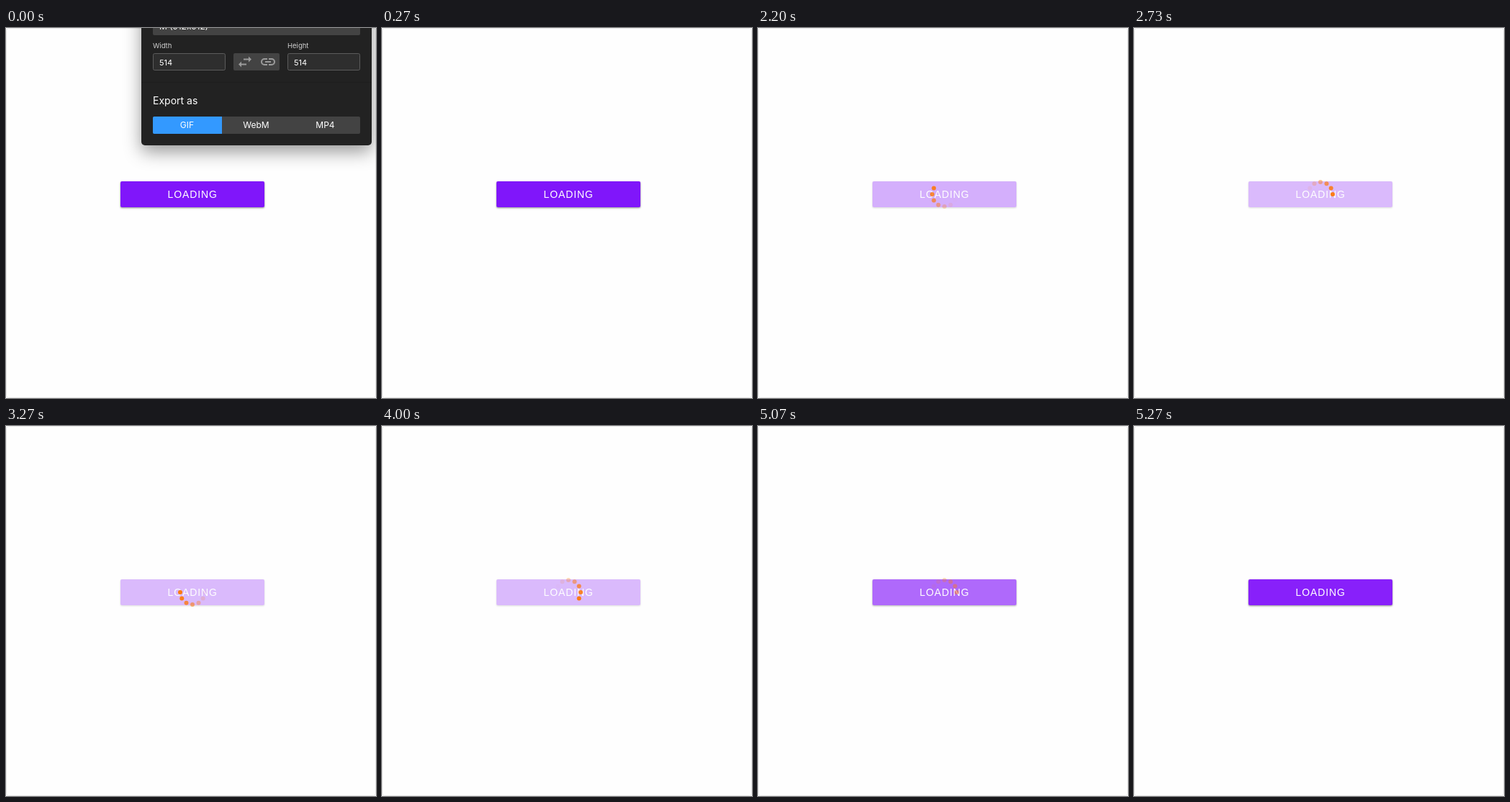
Animation, 514 px wide and 514 px high, one loop 5.34 s. Source, as an HTML page:

```html
<!DOCTYPE html>
<html lang="en">
<head>
<meta charset="utf-8">
<title>Loading button</title>
<style>
  html, body { margin: 0; width: 100%; height: 100%; overflow: hidden; background: #fefefe; }
  svg { display: block; width: 100vw; height: 100vh; }
  text { fill: #fff; font-family: Inter, "Liberation Sans", sans-serif; font-size: 12px; }
  .face { filter: drop-shadow(0 1px 1px rgba(0,0,0,.32)) drop-shadow(0 1px 1px rgba(0,0,0,.15)); }
  .caption { font: 14px "Liberation Sans", Arial, sans-serif; letter-spacing: .9px; text-anchor: middle; }
  .window { fill: #222; filter: drop-shadow(0 9px 12px rgba(0,0,0,.4)); }
  .control { fill: #434343; }
  .field { fill: #2e2e2e; stroke: #5c5c5c; }
  .label { font-size: 9.5px; fill: #d2d2d2; }
  .value { font-size: 11px; }
  .heading { font-size: 14px; }
  .tab { text-anchor: middle; }
  .icon { fill: none; stroke: #9b9b9b; stroke-width: 2; }
</style>
</head>
<body>
<svg viewBox="0 0 514 514">
  <rect x=".5" y=".5" width="513" height="513" rx="3" fill="#fefefe" stroke="#e8e8e8"/>

  <g id="button">
    <rect id="face" class="face" x="159" y="213" width="200" height="36" rx="2"/>
    <text class="caption" x="259.2" y="236">LOADING</text>
  </g>
  <g id="spinner" fill="#fb7a12"></g>

  <g id="panel">
    <rect class="window" x="188" y="-60" width="320" height="223" rx="5"/>
    <rect class="control" x="204" y="-14" width="288" height="24" rx="2"/>
    <text x="213" y="2">M (512x512)</text>
    <text class="label" x="204" y="28">Width</text>
    <text class="label" x="391" y="28">Height</text>
    <rect class="field" x="204.5" y="35.5" width="100" height="23" rx="2"/>
    <rect class="field" x="391.5" y="35.5" width="100" height="23" rx="2"/>
    <text class="value" x="213" y="52">514</text>
    <text class="value" x="400" y="52">514</text>
    <rect class="control" x="316" y="35" width="64" height="24" rx="2"/>
    <path class="icon" d="M330 43.5h8M334 50.5h-8"/>
    <path fill="#9b9b9b" d="M337 39.5l4 4l-4 4zM327 46.5l-4 4l4 4z"/>
    <path class="icon" d="M363 43h-4a4 4 0 0 0 0 8h4M365 43h4a4 4 0 0 1 0 8h-4M360 47h8"/>
    <path d="M188 75.5h320" stroke="#1d1d1d"/>
    <text class="heading" x="204" y="106">Export as</text>
    <rect class="control" x="204" y="123" width="288" height="24" rx="2"/>
    <path d="M300 123v24h-94a2 2 0 0 1-2-2v-20a2 2 0 0 1 2-2z" fill="#3399ff"/>
    <text class="tab" x="251.5" y="139">GIF</text>
    <text class="tab" x="347.5" y="139">WebM</text>
    <text class="tab" x="443.5" y="139">MP4</text>
  </g>
</svg>
<script>
const LOOP = 5340, HOVER = 970, LOAD = 1875, DONE = 4865;
const FADE = 400, SPIN = 1200, DOTS = 12;
const IDLE_COLOR = [128, 22, 250], HOVER_COLOR = [136, 32, 250];

const [button, face, spinner, panel] =
  ['button', 'face', 'spinner', 'panel'].map(id => document.getElementById(id));

const dots = Array.from({ length: DOTS }, (_, i) => {
  const dot = document.createElementNS(spinner.namespaceURI, 'circle');
  const angle = i / DOTS * 2 * Math.PI;
  dot.setAttribute('cx', 259 + 17 * Math.sin(angle));
  dot.setAttribute('cy', 231 - 17 * Math.cos(angle));
  dot.setAttribute('r', 3);
  return spinner.appendChild(dot);
});

const progress = (t, start, duration) => Math.min(1, Math.max(0, (t - start) / duration));

// cubic-bezier(.42, 0, .58, 1)
function easeInOut(x) {
  let low = 0, high = 1;
  for (let i = 0; i < 20; i++) {
    const u = (low + high) / 2, v = 1 - u;
    if (1.26 * u * v * v + 1.74 * u * u * v + u * u * u < x) low = u; else high = u;
  }
  return low * low * (3 - 2 * low);
}

// Each dot flashes on at 40% of its cycle, then fades until the end.
function dotOpacity(phase) {
  if (phase < .39) return 0;
  return phase < .4 ? easeInOut((phase - .39) / .01) : 1 - easeInOut((phase - .4) / .6);
}

function draw(t) {
  panel.setAttribute('opacity', 1 - progress(t, 20, 240));

  const hover = progress(t, HOVER, 230);
  face.setAttribute('fill', `rgb(${IDLE_COLOR.map((c, i) => c + (HOVER_COLOR[i] - c) * hover)})`);

  const loading = easeInOut(progress(t, LOAD, FADE)) - easeInOut(progress(t, DONE, FADE));
  button.setAttribute('opacity', 1 - .7 * loading);
  spinner.setAttribute('opacity', loading);
  dots.forEach((dot, i) => {
    const phase = (t - LOAD) / SPIN - i / DOTS;
    dot.setAttribute('opacity', dotOpacity(phase - Math.floor(phase)));
  });
}

function tick() {
  draw(performance.now() % LOOP);
  requestAnimationFrame(tick);
}
tick();
</script>
</body>
</html>
```
